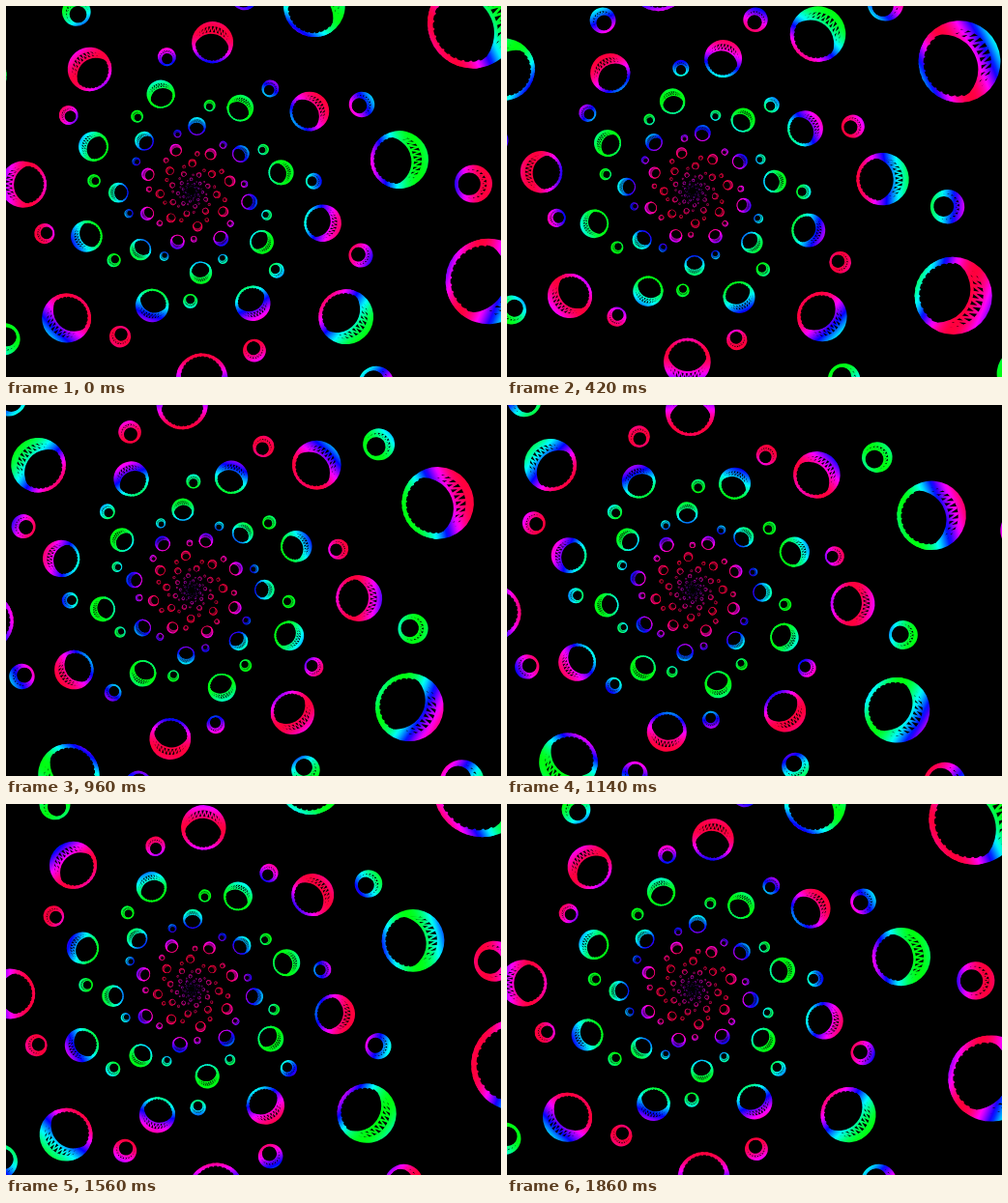
An HTML page with a canvas for the animation above (1.88 s loop, 512 by 384 pixels).

```html
<!DOCTYPE html>
<html lang="en">
<head>
<meta charset="utf-8">
<title>Spiral of rings</title>
<style>
  html, body { margin: 0; width: 100%; height: 100%; overflow: hidden; background: #000; }
  canvas { display: block; }
</style>
</head>
<body>
<canvas id="stage" width="512" height="384"></canvas>
<script>
const W = 512, H = 384, CX = 192, CY = 192;
const LOOP = 1880, STEP = 20;
const TAU = 2 * Math.PI, DEG = Math.PI / 180;

// Neighbours on the spiral differ by one turn and one shrink; a loop advances eight places.
const TURN = 47.78 * DEG, SHRINK = 0.0555, ADVANCE = 8;

// size is relative to the distance from the centre, the rest to the ring's radius
const FAMILIES = [
  { dist: 217.5, angle: -8.7 * DEG, size: 0.138, thin: 0.11, thick: 0.23, far: 0.9, shift: -0.45, teeth: 30, wire: 0.06 },
  { dist: 197.7, angle: -27.1 * DEG, size: 0.067, thin: 0.15, thick: 0.3, far: 0.66, shift: -0.22, teeth: 20, wire: 0.09 }
];

const ctx = document.getElementById('stage').getContext('2d');

// Hue swings between green and crimson with the distance from the centre.
function makeRainbow() {
  const reach = 420, stops = 140;
  const gradient = ctx.createRadialGradient(CX, CY, 0, CX, CY, reach);
  for (let i = 0; i <= stops; i++) {
    const rho = reach * i / stops;
    const hue = 235 + 111 * Math.cos(TAU * (rho - 32) / 136);
    gradient.addColorStop(i / stops, `hsl(${hue}, 100%, 50%)`);
  }
  return gradient;
}
const rainbow = makeRainbow();

function circle(x, radius) {
  ctx.moveTo(x + radius, 0);
  ctx.arc(x, 0, radius, 0, TAU);
}

// Unit ring whose x axis points away from the spiral's centre.
function drawRing({ thin, thick, far, shift, teeth, wire }) {
  const hole = 1 - (thin + thick) / 2, offset = (thin - thick) / 2;

  // the far rim and the wire show only inside the near rim
  ctx.save();
  ctx.beginPath();
  circle(0, 1);
  ctx.clip();

  ctx.lineWidth = wire;
  ctx.beginPath();
  for (let i = 0; i <= 2 * teeth; i++) {
    const a = Math.PI * i / teeth;
    const [x, radius] = i % 2 ? [shift, far] : [offset, hole];
    ctx.lineTo(x + radius * Math.cos(a), radius * Math.sin(a));
  }
  ctx.stroke();
  ctx.lineWidth = wire * 1.4;
  ctx.beginPath();
  circle(shift, far);
  ctx.stroke();
  ctx.restore();

  ctx.beginPath();
  circle(0, 1);
  circle(offset, hole);
  ctx.fill('evenodd');
}

function render(time) {
  const progress = ADVANCE * (time % LOOP) / LOOP;
  ctx.globalCompositeOperation = 'source-over';
  ctx.clearRect(0, 0, W, H);
  ctx.strokeStyle = ctx.fillStyle = '#fff';
  ctx.lineJoin = 'round';

  for (const family of FAMILIES) {
    for (let n = -24; n < 72; n++) {
      const dist = family.dist * Math.exp(-SHRINK * (n + progress));
      const radius = dist * family.size;
      // each loop turns the whole figure by eight places less one full turn
      const angle = family.angle + TURN * n + (TURN - TAU / ADVANCE) * progress;
      const x = CX + dist * Math.cos(angle), y = CY + dist * Math.sin(angle);
      if (x + radius < 0 || x - radius > W || y + radius < 0 || y - radius > H) continue;
      ctx.save();
      ctx.translate(x, y);
      ctx.rotate(angle);
      ctx.scale(radius, radius);
      drawRing(family);
      ctx.restore();
    }
  }

  ctx.globalCompositeOperation = 'source-in';
  ctx.fillStyle = rainbow;
  ctx.fillRect(0, 0, W, H);
  ctx.globalCompositeOperation = 'destination-over';
  ctx.fillStyle = '#000';
  ctx.fillRect(0, 0, W, H);
}

const start = performance.now();
function tick() {
  const elapsed = performance.now() - start;
  render(Math.floor(elapsed / STEP) * STEP);
  requestAnimationFrame(tick);
}
tick();
</script>
</body>
</html>
```
